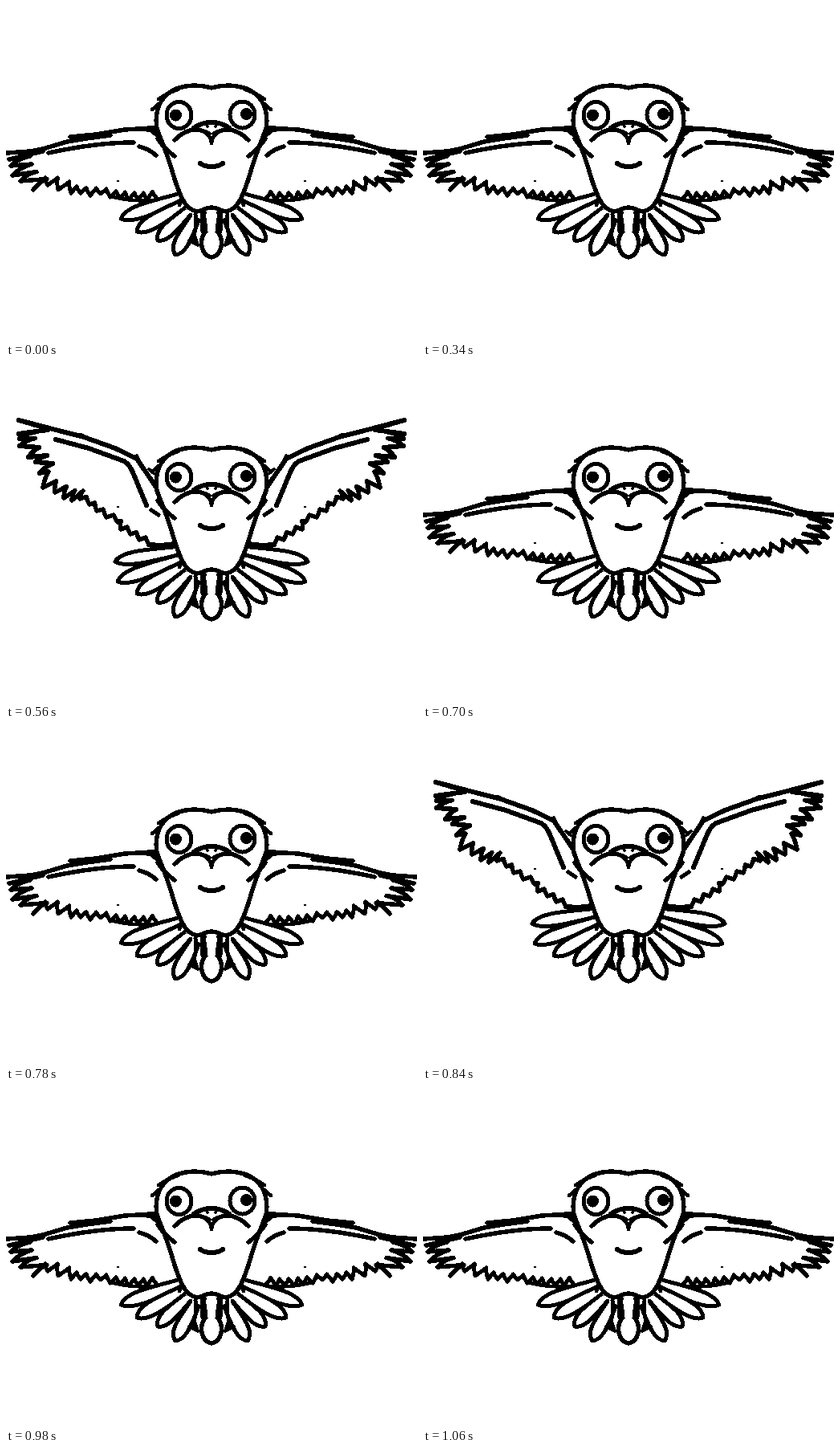
Recreate the animation shown at these times as an HTML page. Size 512 by 416 pixels, loop 1120 ms.

```html
<!DOCTYPE html>
<html lang="en">
<head>
<meta charset="utf-8">
<title>Flapping bird</title>
<style>
  html, body { margin: 0; width: 100%; height: 100%; overflow: hidden; background: #fff; }
  svg { display: block; width: 100vw; height: 100vh; }
  path { stroke-linecap: round; stroke-linejoin: round; }
</style>
</head>
<body>
<svg id="stage" viewBox="0 0 512 416" shape-rendering="crispEdges"></svg>
<script>
const stage = document.getElementById('stage');

function add(parent, tag, attrs) {
  const el = document.createElementNS('http://www.w3.org/2000/svg', tag);
  for (const k in attrs) el.setAttribute(k, attrs[k]);
  parent.appendChild(el);
  return el;
}

const group = (parent, attrs = {}) => add(parent, 'g', attrs);
const line = (g, d, width = 5.5, fill = 'none') =>
  add(g, 'path', { d, fill, stroke: '#000', 'stroke-width': width });
const dot = (g, cx, cy, r) => add(g, 'circle', { cx, cy, r });

// Ragged feather edge through the tips; notches lie (dx, dy) off their midpoints
function frill(g, tips, dx, dy, width) {
  let d = `M${tips[0]}`;
  for (let i = 1; i < tips.length; i++) {
    const [x, y] = tips[i - 1], [tx, ty] = tips[i];
    const nx = (x + tx) / 2 + dx, ny = (y + ty) / 2 + dy;
    const bx = (nx + tx) / 2 + dy * .15, by = (ny + ty) / 2 - dx * .15;
    d += ` L${nx} ${ny} Q${bx} ${by} ${tx} ${ty}`;
  }
  line(g, d, width);
}

// Tail feather from a root to a tip, widest close to the tip
function feather(g, x, y, tx, ty, w) {
  const dx = tx - x, dy = ty - y, len = Math.hypot(dx, dy);
  const nx = -dy / len * w, ny = dx / len * w;
  const at = (k, s) => `${x + dx * k + nx * s} ${y + dy * k + ny * s}`;
  line(g, `M${at(0, .6)} C${at(.4, .8)} ${at(.86, 1.4)} ${tx} ${ty}` +
          ` C${at(.86, -1.2)} ${at(.4, -.8)} ${at(0, -.6)}`, 5, '#fff');
}

// Draws one half twice: as is and mirrored about the middle
function both(parent, draw) {
  draw(group(parent));
  draw(group(parent, { transform: 'translate(512 0) scale(-1 1)' }));
}

function glideWing(g) {
  line(g, 'M1 183 L30 181 L46 178 L76 169 L100 165 L130 161');
  line(g, 'M80 163 L112 160 L148 154 L184 152');
  line(g, 'M164 153 L182 150 L188 162 L180 156 Z', 3, '#000');
  line(g, 'M53 183 C85 176 125 170 159 170');
  line(g, 'M166 175 Q178 178 187 186');
  line(g, 'M46 181 L24 186 L4 191');
  frill(g, [[4, 191], [6, 199], [8, 211], [18, 218], [34, 229]], 25, -8, 5.5);
  frill(g, [[34, 229], [52, 223], [65, 229], [81, 233]], 6, -12, 5);
  frill(g, [[81, 233], [93, 233], [105, 236], [118, 234], [130, 238], [142, 239],
            [153, 241], [165, 241], [176, 241], [187, 238]], 1, -8, 5);
  line(g, 'M134 238 Q158 244 187 242', 4.5);
  dot(g, 139.5, 218, 1.2);
}

function raisedWing(g) {
  line(g, 'M16 65 L58 76 L97 86 L136 100 L163 113 L188 150', 6);
  line(g, 'M93 83 L112 91', 4);
  line(g, 'M62 89 L103 100 L147 116 Q154 120 158 130 L175 171', 6);
  line(g, 'M163 109 L167 117 M178 126 L184 131', 4);
  line(g, 'M181 177 L190 183', 5);
  line(g, 'M16 65 L40 72 L52 77 L16 82', 6);
  frill(g, [[16, 82], [17, 88], [17, 97], [28, 111], [37, 117], [42, 131]], 19, -5, 6);
  frill(g, [[42, 131], [46, 149], [61, 155], [72, 162], [82, 165], [92, 163]], 9, -11, 5.5);
  frill(g, [[92, 163], [104, 170], [113, 178], [125, 186], [139, 192], [143, 201],
            [155, 207], [166, 214], [178, 220]], 2, -6, 5.5);
  line(g, 'M178 220 L193 221 L211 219', 6);
  dot(g, 139.5, 173, 1.2);
}

function tailHalf(g, raised) {
  if (raised) {
    feather(g, 212, 228, 136, 241, 9);
    feather(g, 213, 239, 139, 266, 9.5);
  } else {
    feather(g, 214, 240, 143, 265, 9.5);
  }
  feather(g, 219, 248, 163, 281, 10);
  feather(g, 226, 256, 189, 292, 9.5);
  feather(g, 235, 264, 211, 310, 10);
  line(g, 'M236 260 Q239 274 233 287', 5);
  line(g, 'M244 257 L245 281', 5);
  line(g, 'M228 292 L235 286 L239 298 Z', 4, '#000');
}

function eye(g, cx, cy, px, py) {
  add(g, 'ellipse', { cx, cy, rx: 15.5, ry: 16.5, fill: '#fff', stroke: '#000', 'stroke-width': 5 });
  dot(g, px, py, 7.5);
}

function bodyHalf(g) {
  line(g, 'M190 116 L201 109 L214 104 M182 129 L190 122', 4.5);
  line(g, 'M189 165 Q197 178 210 187');
  line(g, 'M220 241 L216 248', 4.5);
  line(g, 'M210 167 C220 157 230 153 240 154 Q247 156 253 159');
  line(g, 'M247 157 Q255 161 256 171', 4.5);
  dot(g, 251, 150, 1.7);
}

function body(g) {
  line(g, 'M188 153 C185 133 190 113 212 103 C227 98 242 98 256 102' +
          ' C270 98 285 98 300 103 C322 113 327 133 324 153' +
          ' C319 166 314 178 310 190 C304 206 302 221 292 241' +
          ' Q285 254 274 256 C265 255 265 251 256 251 C247 251 247 255 238 256' +
          ' Q227 254 220 241 C210 221 208 206 202 190 C198 178 193 166 188 153 Z', 5.5, '#fff');
  eye(g, 215.5, 136, 211.5, 136);
  eye(g, 294.5, 135.5, 299.5, 134.5);
  line(g, 'M234 152 Q243 145 256 145 Q269 145 278 152', 6);
  both(g, bodyHalf);
  line(g, 'M242 196 Q247 200 256 200 Q265 200 270 196', 6);
}

function middleFeather(g) {
  line(g, 'M247 257 C245 268 251 275 247 283 C240 294 244 311 256 313' +
          ' C268 311 272 294 265 283 C261 275 267 268 265 257', 5.5, '#fff');
  line(g, 'M247 274 L249 281 M265 274 L263 281', 5);
}

function bird(raised) {
  const g = group(stage);
  both(g, h => (raised ? raisedWing : glideWing)(h));
  both(g, h => tailHalf(h, raised));
  middleFeather(g);
  body(g);
  return g;
}

// Start of each pose in ms, and whether the wings are raised
const LOOP = 1120;
const steps = [[0, false], [560, true], [700, false], [840, true], [980, false], [LOOP, false]];

function play(raised) {
  const frames = steps.map(([t, up]) => ({
    offset: t / LOOP,
    opacity: up === raised ? 1 : 0,
    easing: 'step-end'
  }));
  bird(raised).animate(frames, { duration: LOOP, iterations: Infinity }).startTime = 0;
}

play(false);
play(true);
</script>
</body>
</html>
```
